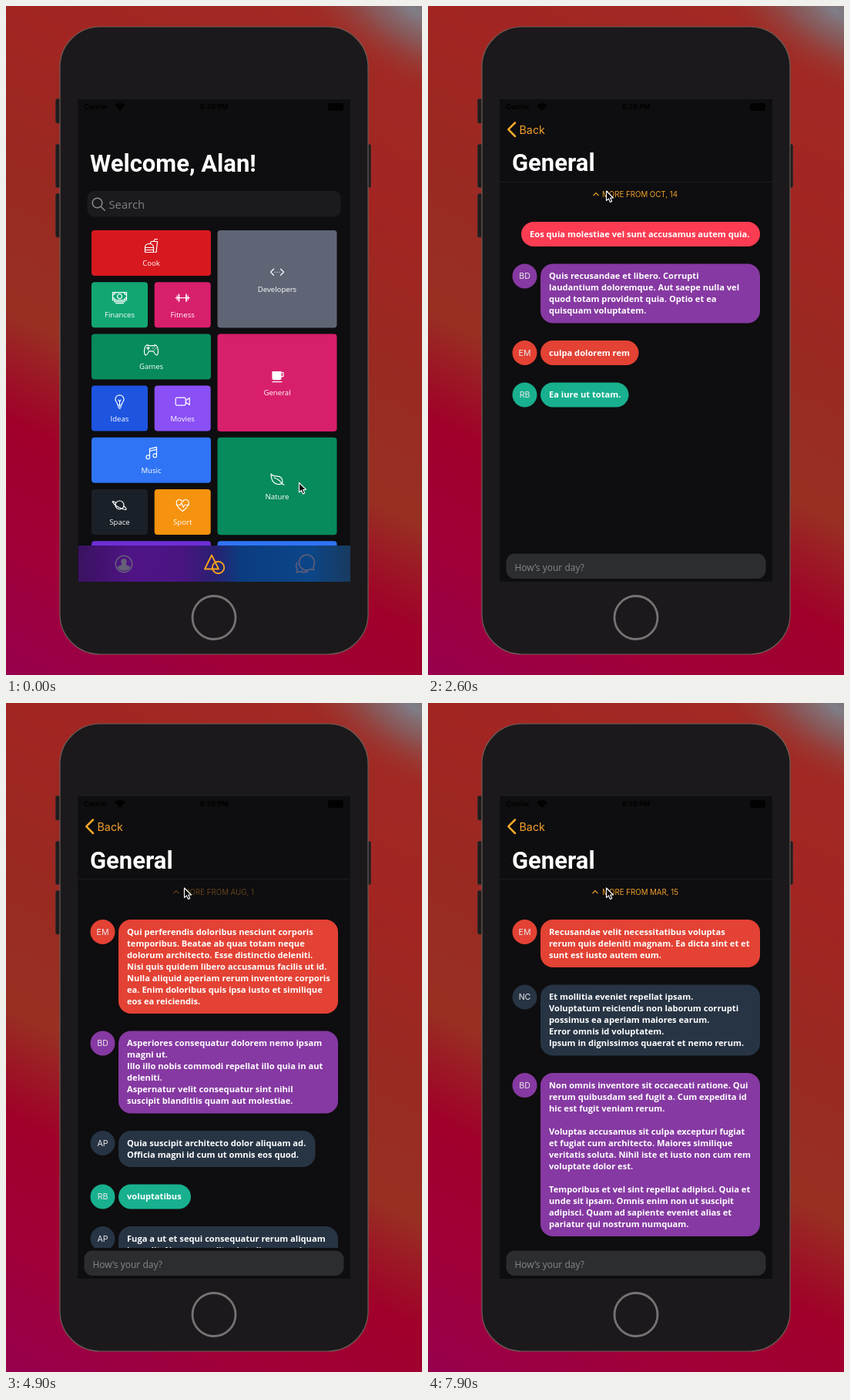
An HTML page for the animation above (8000 ms loop, 540 by 868 pixels).

```html
<!DOCTYPE html>
<html lang="en">
<head>
<meta charset="utf-8">
<title>Chat rooms</title>
<style>
  html, body { margin: 0; width: 100%; height: 100%; overflow: hidden; background: #9a2a22; }
  svg { display: block; width: 100%; height: 100%; }
  text { font-family: "Open Sans", "Noto Sans", sans-serif; white-space: pre; }
  .ui { font-family: Inter, Roboto, sans-serif; }
  .title { font: 700 31px Roboto, "Open Sans", sans-serif; fill: #fff; }
  .msg { font-size: 11.15px; font-weight: 700; fill: #fff; }
  .tile { font-size: 9.6px; fill: #fff; text-anchor: middle; }
  .initials { font-size: 10.6px; fill: #e9e9ec; text-anchor: middle; }
  .icon { fill: none; stroke: #fff; stroke-width: 1.2; stroke-linecap: round; stroke-linejoin: round; }
  .solid { fill: #fff; }
</style>
</head>
<body>
<svg viewBox="0 0 540 868">
  <defs>
    <linearGradient id="wall" gradientUnits="userSpaceOnUse" x1="115" y1="-222" x2="-368" y2="710">
      <stop offset="0" stop-color="#a02c26"/>
      <stop offset=".24" stop-color="#a22522"/>
      <stop offset=".43" stop-color="#992a22"/>
      <stop offset=".57" stop-color="#983022"/>
      <stop offset=".63" stop-color="#9c1725"/>
      <stop offset=".69" stop-color="#a0002a"/>
      <stop offset=".83" stop-color="#a00038"/>
      <stop offset="1" stop-color="#960052"/>
    </linearGradient>
    <radialGradient id="glow" gradientUnits="userSpaceOnUse" cx="0" cy="0" r="1"
      gradientTransform="translate(530 6) rotate(30) scale(190 88)">
      <stop offset="0" stop-color="#7f808a"/>
      <stop offset=".4" stop-color="#80686a" stop-opacity=".7"/>
      <stop offset="1" stop-color="#9a3a30" stop-opacity="0"/>
    </radialGradient>
    <linearGradient id="tabs">
      <stop offset="0" stop-color="#3a1260"/>
      <stop offset=".2" stop-color="#4f1486"/>
      <stop offset=".38" stop-color="#4a1482"/>
      <stop offset=".5" stop-color="#2a2070"/>
      <stop offset=".6" stop-color="#0b3c80"/>
      <stop offset=".85" stop-color="#0c4688"/>
      <stop offset="1" stop-color="#183a60"/>
    </linearGradient>
    <clipPath id="screenClip"><rect x="93.5" y="121" width="353.5" height="626"/></clipPath>
    <clipPath id="listClip"><rect x="93.5" y="229" width="353.5" height="478"/></clipPath>
  </defs>

  <rect width="540" height="868" fill="url(#wall)"/>
  <rect width="540" height="868" fill="url(#glow)"/>

  <g fill="#1f1c1e" stroke="#3a2a2a" stroke-width=".8">
    <rect x="64.5" y="120.5" width="9" height="31.5" rx="2"/>
    <rect x="64.5" y="179.5" width="9" height="56" rx="2"/>
    <rect x="64.5" y="243.5" width="9" height="56.5" rx="2"/>
    <rect x="465" y="179.5" width="8.5" height="56" rx="2"/>
  </g>
  <rect x="70" y="27" width="400" height="814" rx="52" fill="#1b191b" stroke="#6c5e58" stroke-width="1.2"/>
  <circle cx="270" cy="793.5" r="28" fill="#1b191b" stroke="#757374" stroke-width="2.8"/>
  <rect x="93.5" y="121" width="353.5" height="626" fill="#0e0d0f"/>

  <g clip-path="url(#screenClip)">
    <g id="home">
      <text id="welcome" class="title" x="109" y="214.5">Welcome, Alan!</text>
      <rect x="105.5" y="240" width="329" height="33.5" rx="9" fill="#1b1a1c"/>
      <g fill="none" stroke="#8b8a8e" stroke-width="1.5" stroke-linecap="round">
        <circle cx="118.5" cy="255.5" r="6.3"/><path d="M123.2 260.2l5 5"/>
      </g>
      <text x="133.5" y="262.5" font-size="14.8" fill="#828186">Search</text>
      <g id="tiles"></g>
      <rect x="93.5" y="700" width="353.5" height="47" fill="url(#tabs)"/>
      <g fill="none" stroke="#655f78" stroke-width="1.5">
        <circle cx="153" cy="724" r="10.7"/>
        <path d="M153 717a4 4 0 0 1 3 6.5q-.5 1.5 1 2.3q4 1 4.5 3a11 11 0 0 1-17 0q.5-2 4.500-3q1.5-.8 1-2.300a4 4 0 0 1 3-6.5z" fill="#655f78" stroke="none"/>
        <path d="M399.5 731.5l-4-.8a10 10 0 1 1 3.500-3.500zM378 722c-2 3-1.500 6 0 8l-.5 5l4.500-1.500c3 1.500 7 1.500 10 0"/>
      </g>
      <g fill="none" stroke="#f5a21f" stroke-width="1.9" stroke-linejoin="round">
        <path d="M267 712.5l9 18h-18z"/><circle cx="275.5" cy="728.5" r="7.7"/>
      </g>
    </g>
    <rect id="dim" x="93.5" y="121" width="353.5" height="626"/>

    <g id="page">
      <rect x="93.5" y="121" width="353.5" height="626" fill="#0e0d0f"/>
      <path d="M93.5 228.5H447" stroke="#1c1a1d"/>
      <text id="heading" class="title" x="109" y="214.5">General</text>
      <g id="chat">
        <g clip-path="url(#listClip)"><g id="list"></g></g>
        <g id="more">
          <path id="caret" d="M-3.5 2L0-1.5L3.5 2" fill="none" stroke="#f0a12c" stroke-width="1.1"/>
          <text id="moreText" class="ui" y="248.5" font-size="9.7" fill="#f0a12c" text-anchor="end"></text>
        </g>
        <rect x="101.5" y="710.5" width="337" height="32.5" rx="11" fill="#2c2d2f"/>
        <text x="112.5" y="733" font-size="12" fill="#88888b">How’s your day?</text>
      </g>
    </g>

    <g id="back">
      <path d="M113 151.5L104.3 160.2L113 169" fill="none" stroke="#f7a928" stroke-width="2.5" stroke-linecap="round" stroke-linejoin="round"/>
      <text id="backText" class="ui" font-size="14.3" fill="#f0a12c">Back</text>
    </g>

    <g fill="#020202" font-size="9" font-weight="700">
      <text class="ui" x="101" y="134">Carrier</text>
      <path d="M141 129q7-6 14 0l-7 7z"/>
      <text class="ui" x="270" y="134" text-anchor="middle">8:26 PM</text>
      <rect x="418" y="126" width="20" height="10" rx="2.5"/>
    </g>
  </g>

  <g id="ring" fill="none">
    <circle r="16.7" stroke="#111" stroke-opacity=".7" stroke-width="3"/>
    <circle r="18.3" stroke="#fff" stroke-width="1.1"/>
    <circle r="15" stroke="#fff" stroke-width="1.3"/>
  </g>
  <path id="cursor" d="M0 0V12.5L2.9 9.9L5 14.5L7.2 13.5L5.2 9H9Z" fill="#080808" stroke="#fff" stroke-width="1.1" stroke-linejoin="round"/>
</svg>

<script>
const $ = id => document.getElementById(id);
const clamp = x => Math.max(0, Math.min(1, x));
const span = (t, from, to) => clamp((t - from) / (to - from));
const mix = (a, b, p) => a + (b - a) * p;
const easeOut = p => 1 - (1 - p) ** 3;
const easeInOut = p => p * p * (3 - 2 * p);

function add(parent, tag, attrs, text) {
  const node = document.createElementNS('http://www.w3.org/2000/svg', tag);
  for (const key in attrs) node.setAttribute(key, attrs[key]);
  if (text) node.textContent = text;
  parent.append(node);
  return node;
}

// Home tiles
const icons = {
  Cook: 'M-8 8H3M-7.5 5H2.5M-8 2q0-5 5.5-5t5.5 5zM-1-4L0-6H8L6.5 8H4.5M3-6L5-9H8M-8 2v5q0 1 1 1H2q1 0 1-1V2',
  Developers: 'M-4.5-4L-8.5 0L-4.5 4M4.5-4L8.5 0L4.5 4M-3 0h.1M0 0h.1M3 0h.1',
  Finances: 'M-9-7H9V3H-9zM-7 5H7M-5 7H5M3-2a3 3 0 1 1-6 0a3 3 0 1 1 6 0M-9-4q3 0 3-3M9-4q-3 0-3-3M-9 0q3 0 3 3M9 0q-3 0-3 3',
  Fitness: 'M-9 0H9M-7-2.5V2.5M-5-4.5V4.5M5-4.5V4.5M7-2.5V2.5M-4.5-4.5V4.5M4.5-4.5V4.5',
  Games: 'M-5-6q2 1 5 1t5-1q3 0 4 7q0 6-2 6q-2 0-4-5H-3q-2 5-4 5q-2 0-2-6q1-7 4-7M-6-2h4M-4-4v4M4-4h.1M4 0h.1M2-2h.1M6-2h.1',
  Ideas: 'M-2.5 5q0-2-1.5-4a5.5 5.5 0 1 1 8 0q-1.5 2-1.5 4zM-2 7H2M-1 9H1M0 5V0L-1.5-2M0 0L1.5-2',
  Movies: 'M-7-5H2q2 0 2 2V3q0 2-2 2H-7q-2 0-2-2V-3q0-2 2-2M4-1L9-4.5V4.5L4 1',
  Music: 'M-2 5V-6L7-8V3M-2-3L7-5M-2 5a2.3 2 0 1 1-4.5 0a2.3 2 0 1 1 4.5 0M7 3a2.3 2 0 1 1-4.5 0a2.3 2 0 1 1 4.5 0',
  Space: 'M5.5 0a5.5 5.5 0 1 1-11 0a5.5 5.5 0 1 1 11 0M-5-3q-5-3-4-1q2 4 8 7t9 3q2-1-3-5',
  Sport: 'M0 8Q-8 2-8-2.5Q-8-7-4-7Q-1-7 0-4Q1-7 4-7Q8-7 8-2.5Q8 2 0 8M-8 0H-3L-1.5-3L1 3L2.5 0H8',
  Nature: 'M-8-7Q-6-4 0-4Q7-4 7 4Q5 8-1 6Q-8 4-8-7M-4-2Q2 0 5 4Q7 7 9 7'
};
const [ROW, PITCH] = [291, 67.2];
const tiles = [
  // name, column x, row, width, height, colour
  ['Cook', 111, 0, 155, 59, '#d7191f'],
  ['Developers', 274.5, 0, 155, 126.5, '#5f6575'],
  ['Finances', 111, 1, 73, 59, '#12a673'],
  ['Fitness', 192.7, 1, 73, 59, '#d81f6b'],
  ['Games', 111, 2, 155, 59, '#078a5c'],
  ['General', 274.5, 2, 155, 126.5, '#d81f6b'],
  ['Ideas', 111, 3, 73, 59, '#1d55e0'],
  ['Movies', 192.7, 3, 73, 59, '#8a50f5'],
  ['Music', 111, 4, 155, 59, '#2f74f5'],
  ['Nature', 274.5, 4, 155, 126.5, '#078a5c'],
  ['Space', 111, 5, 73, 59, '#1a2028'],
  ['Sport', 192.7, 5, 73, 59, '#f5930f'],
  ['', 111, 6, 155, 59, '#6d2fd6'],
  ['', 274.5, 6, 155, 59, '#2f74f5']
];
for (const [name, x, row, width, height, fill] of tiles) {
  const y = ROW + row * PITCH, cx = x + width / 2, cy = y + height / 2;
  add($('tiles'), 'rect', { x, y, width, height, rx: 4, fill });
  if (!name) continue;
  const icon = add($('tiles'), 'g', { class: 'icon', transform: `translate(${cx} ${cy - 9})` });
  if (name === 'General') {
    add(icon, 'path', { class: 'solid', d: 'M-6-5H5V3Q5 5 3 5H-4Q-6 5-6 3z' });
    add(icon, 'path', { d: 'M5-4H8V1H5M-6 8H6' });
  } else add(icon, 'path', { d: icons[name] });
  add($('tiles'), 'text', { class: 'tile', x: cx, y: cy + 16.5 }, name);
}

// Chat history, oldest first; '|' separates lines
const colors = { BD: '#8639a2', EM: '#e34234', RB: '#18b08f', PT: '#18b08f', AP: '#273444', NC: '#273444', JN: '#727d7d', me: '#fc3c52' };
const FULL = 285, LINE = 15, GAP = 22.5;
const history = [
  [
    ['EM', 'Recusandae velit necessitatibus voluptas|rerum quis deleniti magnam. Ea dicta sint et et|sunt est iusto autem eum.'],
    ['NC', 'Et mollitia eveniet repellat ipsam.|Voluptatum reiciendis non laborum corrupti|possimus ea aperiam maiores earum.|Error omnis id voluptatem.|Ipsum in dignissimos quaerat et nemo rerum.'],
    ['BD', 'Non omnis inventore sit occaecati ratione. Qui|rerum quibusdam sed fugit a. Cum expedita id|hic est fugit veniam rerum.||Voluptas accusamus sit culpa excepturi fugiat|et fugiat cum architecto. Maiores similique|veritatis soluta. Nihil iste et iusto non cum rem|voluptate dolor est.||Temporibus et vel sint repellat adipisci. Quia et|unde sit ipsam. Omnis enim non ut suscipit|adipisci. Quam ad sapiente eveniet alias et|pariatur qui nostrum numquam.']
  ], [
    ['PT', 'Veniam voluptatibus minus eos amet enim ea|praesentium tempore. Debitis sequi similique|temporibus quos et quasi adipisci|consequatur eligendi. Recusandae beatae|molestiae. Quibusdam ut veniam sit quia. Non|sint quos dolor possimus nam possimus|tempore qui aliquam.'],
    ['AP', 'Harum quis veniam alias sequi quos pariatur|asperiores dolorum velit.'],
    ['JN', 'magni', 57.5],
    ['AP', 'nobis', 54],
    ['JN', 'Voluptatem ratione quod molestiae quam|quod quidem. Debitis voluptatem temporibus|tempore tempore illo aperiam atque amet.'],
    ['JN', 'Maiores dolor repellat rem sint voluptas est|nostrum voluptatibus excepturi.']
  ], [
    ['EM', 'Qui perferendis doloribus nesciunt corporis|temporibus. Beatae ab quas totam neque|dolorum architecto. Esse distinctio deleniti.|Nisi quis quidem libero accusamus facilis ut id.|Nulla aliquid aperiam rerum inventore corporis|ea. Enim doloribus quis ipsa iusto et similique|eos ea reiciendis.'],
    ['BD', 'Asperiores consequatur dolorem nemo ipsam|magni ut.|Illo illo nobis commodi repellat illo quia in aut|deleniti.|Aspernatur velit consequatur sint nihil|suscipit blanditiis quam aut molestiae.'],
    ['AP', 'Quia suscipit architecto dolor aliquam ad.|Officia magni id cum ut omnis eos quod.', 255.5]
  ], [
    ['RB', 'voluptatibus', 94],
    ['AP', 'Fuga a ut et sequi consequatur rerum aliquam|impedit. Nemo expedita sint aliquam qui|excepturi nulla qui. Tempora quidem distinctio|omnis debitis. Quos totam eum voluptas. Et|pariatur voluptatem aperiam adipisci.||Vitae voluptate dolores omnis. Error et facere.|Debitis veritatis perferendis. Soluta minus aut|consequatur.||Sed doloribus sit quo ut repellendus autem|accusamus. Quis distinctio beatae.|Consequatur totam et architecto distinctio|dolore. Voluptas earum quas dolorem eligendi|nulla optio iure ab. Voluptates qui aut illo|cumque architecto nisi animi.'],
    ['PT', 'Sint sequi amet quasi totam. Voluptatem iure|eum repellat quis pariatur. Eum eum qui et|nulla cumque incidunt qui reiciendis suscipit.|Mollitia at in fugiat libero ex.']
  ], [
    ['me', 'Eos quia molestiae vel sunt accusamus autem quia.', 310],
    ['BD', 'Quis recusandae et libero. Corrupti|laudantium doloremque. Aut saepe nulla vel|quod totam provident quia. Optio et ea|quisquam voluptatem.'],
    ['EM', 'culpa dolorem rem', 127.5],
    ['RB', 'Ea iure ut totam.', 114.5]
  ]
];

// Rounded box with separate top and bottom corner radii
const bubblePath = (x, y, w, h, a, b) =>
  `M${x + a} ${y}h${w - 2 * a}a${a} ${a} 0 0 1 ${a} ${a}v${h - a - b}a${b} ${b} 0 0 1 ${-b} ${b}` +
  `h${2 * b - w}a${b} ${b} 0 0 1 ${-b} ${-b}v${a + b - h}a${a} ${a} 0 0 1 ${a} ${-a}z`;

let bottom = 0;
const batches = history.map(messages => {
  const top = bottom, node = add($('list'), 'g', {});
  messages.forEach(([who, body, width = FULL], i) => {
    const lines = body.split('|'), height = lines.length * LINE + 17;
    const joinsAbove = i > 0 && messages[i - 1][0] === who;
    const joinsBelow = i + 1 < messages.length && messages[i + 1][0] === who;
    const x = who === 'me' ? 431 - width : 146, fill = colors[who];
    const d = bubblePath(x, bottom, width, height, joinsAbove ? 2 : 16, joinsBelow ? 2 : 16);
    add(node, 'path', { d, fill });
    lines.forEach((line, n) => add(node, 'text', { class: 'msg', x: x + 11, y: bottom + 19.5 + n * LINE }, line));
    if (who !== 'me' && !joinsAbove) {
      add(node, 'circle', { cx: 125.5, cy: bottom + 16, r: 16, fill });
      add(node, 'text', { class: 'initials ui', x: 125.5, y: bottom + 19.8 }, who);
    }
    bottom += height + (joinsBelow ? 4 : GAP);
  });
  return { top, node };
}).reverse();

// label, right edge of the text, caret x
const labels = [['OCT, 14', 324, 218], ['SEP, 23', 324.5, 218], ['AUG, 1', 322, 221], ['MAY, 10', 325, 218], ['MAR, 15', 325, 217]];
const LOOP = 8000, TILE_TAP = 660, PUSH = 840;
const taps = [2750, 3750, 4700, 6620];
const LOAD = 320, SLIDE = 450;

const move = (node, x, y) => node.setAttribute('transform', `translate(${x} ${y})`);
const fade = (node, value) => {
  node.setAttribute('opacity', value);
  node.style.display = value > 0 ? '' : 'none';
};

function drawPush(t) {
  const p = easeOut(span(t, PUSH, PUSH + 500));
  move($('home'), -116 * p, 0);
  fade($('home'), p < 1 ? 1 : 0);
  fade($('welcome'), 1 - clamp(p * 1.5));
  fade($('dim'), 0.25 * p);
  move($('page'), 354 * (1 - p), 0);
  fade($('page'), p > 0 ? 1 : 0);
  move($('back'), 0, 6 * (1 - p));
  fade($('back'), clamp(p * 2 - 0.8));
  const scale = 1 + 1.25 * (1 - p);
  $('backText').setAttribute('transform', `translate(${118.5 - 12 * (1 - p)} ${165.5 + 50 * (1 - p)}) scale(${scale})`);
}

function drawChat(t) {
  const loaded = taps.filter(tap => t >= tap + LOAD).length;
  const settle = loaded ? 1 : 0;
  const from = batches[Math.max(0, loaded - 1)].top;
  const start = loaded ? taps[loaded - 1] + LOAD : 0;
  const slide = easeOut(span(t, start, start + SLIDE));
  fade($('chat'), span(t, 1500, 1750));
  move($('heading'), 0, t > 1500 ? settle - 1 : 0);
  move($('list'), 0, 280 + settle - mix(from, batches[loaded].top, loaded ? slide : 1));
  batches.forEach(({ node }, i) => fade(node, i < loaded ? 1 : i > loaded ? 0 : loaded ? clamp(slide * 2) : 1));

  const [label, right, caretX] = labels[loaded];
  $('moreText').textContent = 'MORE FROM ' + label;
  $('moreText').setAttribute('x', right);
  move($('caret'), caretX, 245);
  move($('more'), 0, settle - 1);
  const pressed = taps.some(tap => t >= tap + 180 && t < tap + LOAD);
  fade($('more'), pressed ? 0.36 : loaded ? mix(0.36, 1, span(t, start, start + 200)) : 1);
}

function drawPointer(t) {
  const a = easeInOut(span(t, 0, 620)), b = easeInOut(span(t, 1400, 2300));
  const x = mix(mix(380.5, 377, a), 231.5, b);
  const y = mix(mix(618.5, 526.5, a), 240, b);
  move($('cursor'), x, y);
  move($('ring'), x + 0.5, y + 0.8);
  fade($('ring'), [TILE_TAP, ...taps].some(tap => t >= tap && t < tap + 180) ? 1 : 0);
}

function draw(t) {
  drawPush(t);
  drawChat(t);
  drawPointer(t);
}

const origin = performance.now();
function tick() {
  draw((performance.now() - origin) % LOOP);
  requestAnimationFrame(tick);
}
tick();
</script>
</body>
</html>
```
